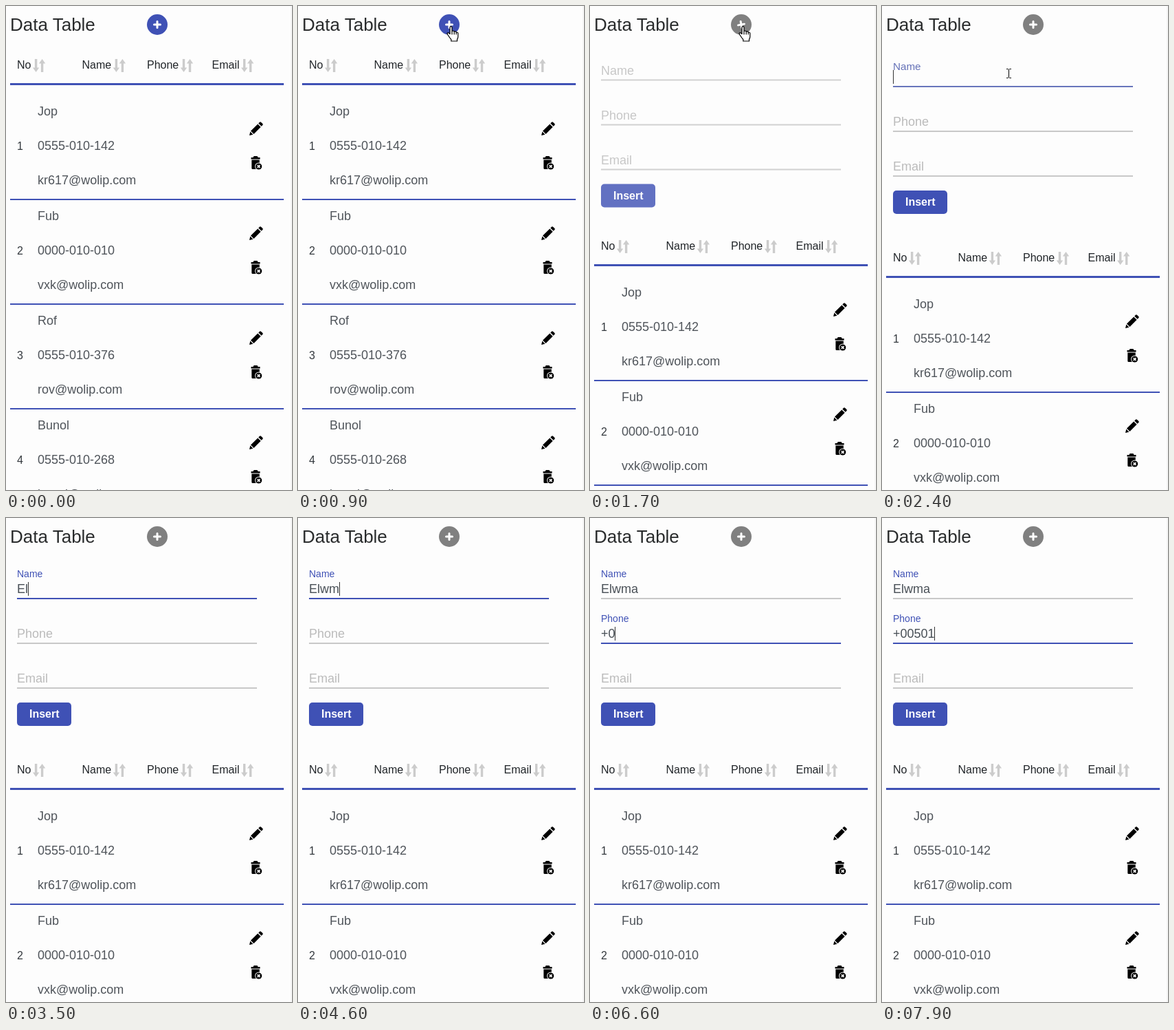
Write an HTML page that moves like this. It is 416 px wide and 703 px high and loops after 8000 ms.

```html
<!DOCTYPE html>
<html lang="en">
<head>
<meta charset="utf-8">
<title>Data Table</title>
<style>
  html, body { margin: 0; width: 100%; height: 100%; overflow: hidden; background: #fdfdfd; }
  svg { display: block; width: 416px; height: 703px; }
  text { font-family: "Liberation Sans", Arial, sans-serif; white-space: pre; }
</style>
</head>
<body>
<svg id="stage" viewBox="0 0 416 703">
  <defs>
    <path id="sort" fill="#ccc" d="M3 0h3.4v12.6h3L4.7 19 0 12.6h3zM12 19h3.4V6.4h3L13.7 0 9 6.4h3z"/>
    <path id="pencil" d="M0 20 1.3 14.6 5.4 18.7zM2 13.6 12.2 3.4 16.6 7.8 6.4 18zM13.2 2.4 14.9 .7Q15.9-.2 16.9 .7L19.3 3.1Q20.2 4.1 19.3 5.1L17.6 6.8z"/>
    <g id="bin">
      <path d="M.5 2h3l1-2h5l1 2h3v2.4H.5zM1.3 5.6h11.4V19H2.7Q1.4 19 1.3 17.4z"/>
      <circle cx="11.6" cy="15" r="5.5" fill="#fdfdfd"/>
      <circle cx="11.6" cy="15" r="4.6"/>
      <path d="M9.7 13.1l3.8 3.8m0-3.8-3.8 3.8" stroke="#fff" stroke-width="1.5"/>
    </g>
  </defs>
  <path d="M414 0h2v703h-2z" fill="#f4f4f4"/>
  <text x="6" y="36" font-size="26" fill="#292b2c">Data Table</text>
  <circle id="disc" cx="220" cy="27" r="15"/>
  <path id="plus" d="M215.5 27h9M220 22.5v9" stroke="#fff" stroke-width="3" stroke-linecap="round"/>
  <g id="form"></g>
  <g id="table"></g>
  <path id="arrow" d="M.5 .5v16l3.7-3.5 2.5 6 2.6-1.1-2.5-5.8h5.2z" fill="#fff" stroke="#000"/>
  <path id="hand" d="M5 12V2.2Q5 .6 6.5 .6T8 2.2V8.2Q8.3 7 9.6 7T11.2 8.6Q11.5 7.8 12.7 7.9T14.2 9.5Q16.8 8.6 16.8 11.2V15.5Q16.8 17.5 15.5 19.3V22H6.8V19.6Q4.5 17 3 14.5 1.3 12.2 1 11.2 1 9.8 2.5 9.9T5 12ZM8 8.2v4.3M11.2 8.6v4M14.2 9.5v3" fill="#fff" stroke="#000" stroke-width="1.2"/>
  <path id="beam" d="M181 91.5h2.5l1 1 1-1h2.5M184.5 92v12M181 104.5h2.5l1-1 1 1h2.5" fill="none" stroke="#000"/>
</svg>
<script>
const LOOP = 8000, STEP = 100;
const BLUE = [63, 81, 181], GREY = [128, 128, 128], LINE = [200, 200, 200], HINT = [187, 187, 187];
const $ = id => document.getElementById(id);

function add(parent, tag, attrs, text) {
  const el = document.createElementNS("http://www.w3.org/2000/svg", tag);
  for (const k in attrs) el.setAttribute(k, attrs[k]);
  if (text) el.textContent = text;
  parent.append(el);
  return el;
}
const label = (parent, x, y, size, fill, text) =>
  add(parent, "text", { x, y, "font-size": size, fill }, text);
const bar = (parent, x, y, width, height, fill) =>
  add(parent, "rect", { x, y, width, height, fill });
const icon = (parent, name, x, y) =>
  add(parent, "use", { href: "#" + name, transform: `translate(${x} ${y})` });
const mix = (a, b, k) => `rgb(${a.map((v, i) => Math.round(v + (b[i] - v) * k))})`;
const show = (el, on) => el.setAttribute("visibility", on ? "visible" : "hidden");

// Value of a list of samples taken every STEP from start
function sample(t, start, list, before) {
  const i = Math.floor((t - start) / STEP);
  return i < 0 ? before : list[Math.min(i, list.length - 1)];
}

const table = $("table"), form = $("form"), indigo = mix(BLUE, BLUE, 0);

[["No", 38.9], ["Name", 155.7], ["Phone", 253.8], ["Email", 342]].forEach(([name, x], i) => {
  label(table, 16 + i * 94.5, 91, 16, "#212529", name);
  icon(table, "sort", x, 77);
});
bar(table, 6, 112, 398, 3, indigo);

[
  ["Jop", "0555-010-142", "kr617@wolip.com"],
  ["Fub", "0000-010-010", "vxk@wolip.com"],
  ["Rof", "0555-010-376", "rov@wolip.com"],
  ["Bunol", "0555-010-268", "bunol@wolip.com"]
].forEach((row, i) => {
  const y = i * 152;
  label(table, 16, y + 209, 16, "#33383d", String(i + 1));
  row.forEach((s, j) => label(table, 46, y + 159 + j * 50, 18, "#4f545a", s));
  icon(table, "pencil", 354, y + 168);
  icon(table, "bin", 356, y + 218);
  bar(table, 6, y + 280, 398, 2, indigo);
});

const fields = [
  { name: "Name", value: "Elwma", keys: [3300, 3500, 3800, 4600, 4900],
    focus: 2400, blur: 5200, rise: [.7, .95, 1] },
  { name: "Phone", value: "+00501", keys: [6400, 6600, 6700, 6800, 7700, 7900],
    focus: 5200, blur: LOOP, rise: [.3, .85, 1] },
  { name: "Email", value: "", keys: [], focus: LOOP, blur: LOOP, rise: [0] }
];
fields.forEach((f, i) => {
  f.y = 109 + i * 65;
  f.line = bar(form, 16, f.y + 7, 349, 2);
  f.label = label(form, 16, f.y, 18, "", f.name);
  f.text = label(form, 16, f.y, 18, "#495057", "");
  f.caret = bar(form, 16, f.y - 16, 1, 20, "#333");
});
add(form, "rect", { x: 16, y: 268, width: 79, height: 34, rx: 5, fill: indigo });
label(form, 34, 290, 16, "#fff", "Insert").setAttribute("font-weight", "bold");

const caretOff = [[2800, 3300], [4300, 4600], [5700, 6200], [7300, 7700]];

function drawField(f, t, lit) {
  const k = sample(t, f.focus, f.rise, 0);
  const fade = sample(t, f.blur, [.3, .85, .97, 1], 0);
  const size = 18 - 4 * k;
  f.label.setAttribute("font-size", size);
  f.label.setAttribute("y", f.y - 23 * k);
  f.label.setAttribute("fill", mix(HINT, BLUE, k));
  f.line.setAttribute("fill", mix(LINE, BLUE, k * (1 - fade)));
  f.text.textContent = f.value.slice(0, f.keys.filter(key => key <= t).length);
  const width = f.text.textContent ? f.text.getComputedTextLength() : 0;
  f.caret.setAttribute("x", Math.floor(16 + width));
  show(f.caret, lit && t >= f.focus && t < f.blur);
}

function draw(t) {
  const drop = sample(t, 1400, [4, 125, 225, 263, 274, 278, 279, 280], 0);
  const lift = sample(t, 1600, [-29, -9.5, -3, -1, 0], -50);
  table.setAttribute("transform", `translate(0 ${drop})`);
  form.setAttribute("transform", `translate(0 ${lift})`);
  form.setAttribute("opacity", 1 + lift / 50);
  show(form, lift > -50);

  $("disc").setAttribute("fill", mix(BLUE, GREY, sample(t, 1400, [.08, .67, .94, 1], 0)));
  $("plus").setAttribute("transform", `rotate(${drop / 280 * 180} 220 27)`);

  const lit = !caretOff.some(([a, b]) => t >= a && t < b);
  fields.forEach(f => drawField(f, t, lit && lift > -50));

  const [x, y] = sample(t, 500, [[331, 36], [266, 31], [237, 30], [217, 29], [216, 29]], [331, 36]);
  const pointer = `translate(${x} ${y})`;
  $("arrow").setAttribute("transform", pointer);
  $("hand").setAttribute("transform", pointer);
  show($("arrow"), t >= 500 && t < 800);
  show($("hand"), t >= 800 && t < 2100);
  show($("beam"), t >= 2400 && t < 2600);
}

const begin = performance.now();
function tick() {
  const t = (performance.now() - begin) % LOOP;
  draw(Math.floor(t / STEP) * STEP);
  requestAnimationFrame(tick);
}
tick();
</script>
</body>
</html>
```
